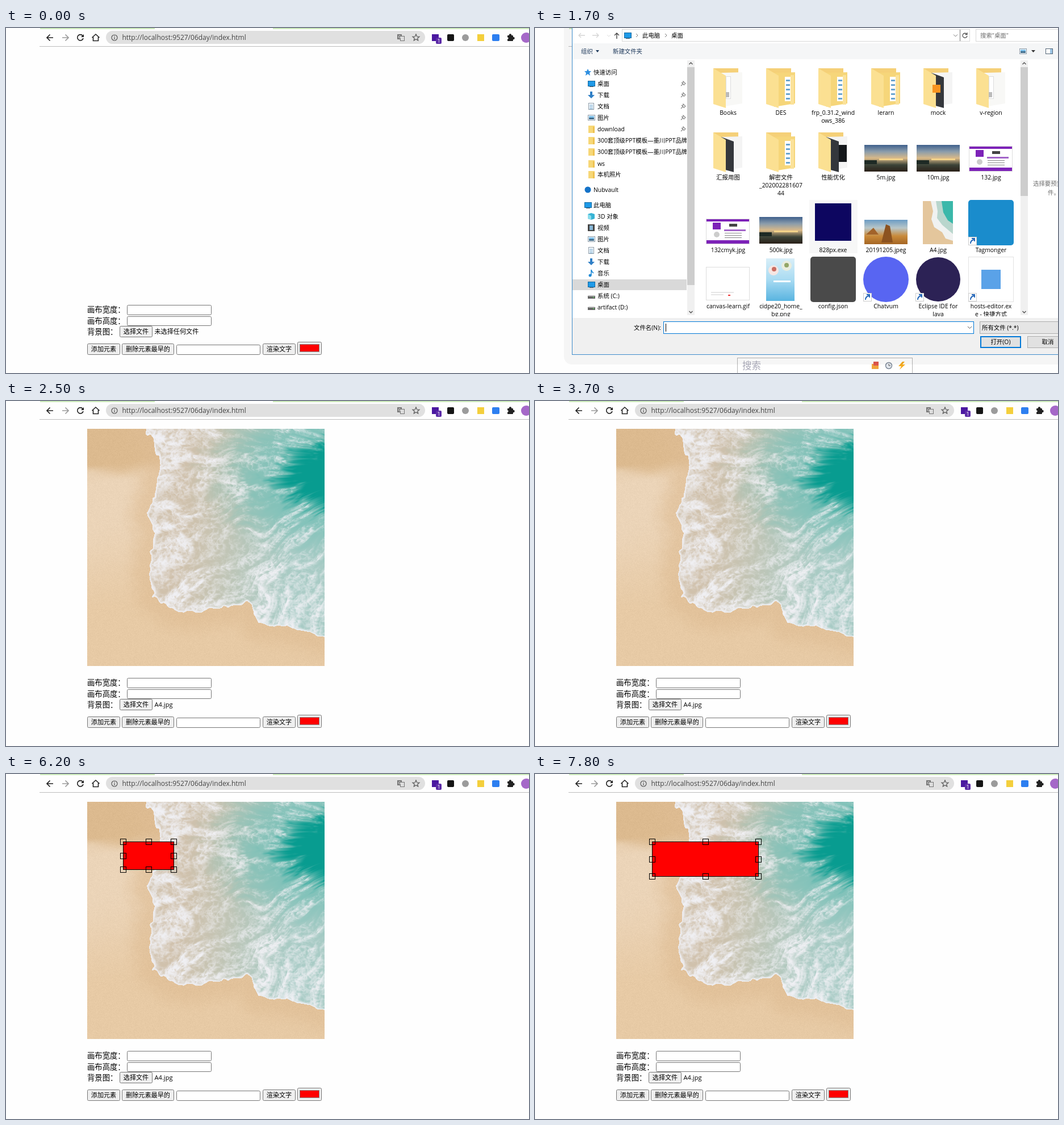
Recreate the animation shown at these times as an HTML page with a canvas. Size 921 by 608 pixels, loop 8 s.

```html
<!DOCTYPE html>
<html lang="zh">
<head>
<meta charset="utf-8">
<title>Canvas editor</title>
<style>
html, body { margin: 0; width: 100%; height: 100%; overflow: hidden; background: #fefefe; }
svg, canvas, #box { position: absolute; }
body > svg { left: 0; top: 0; width: 921px; height: 608px; overflow: hidden; }
text { font-family: "Open Sans", "Noto Sans CJK SC", "Noto Sans CJK", sans-serif; white-space: pre; }
#beach { left: 143px; top: 49px; }

.anim, #beach, #box, #box i, #dialog { animation: 8s step-end infinite; }
#beach, .late { animation-name: late; }
.early { animation-name: early; }
.add { animation-name: add; }
.remove { animation-name: remove; }
.file { animation-name: file; }
.popup { animation-name: popup; }
.content { animation-name: content; }
.picked { animation-name: picked; }
.unpicked { animation-name: unpicked; }
#dialog { animation-name: dialog; transform-origin: 522px 275px; }
#box { animation-name: box; background: red; box-shadow: inset 0 0 0 1px #000; }
#box i { animation-name: handles; position: absolute; width: 11px; height: 11px; box-sizing: border-box; border: 1px solid #000; }

@keyframes late { 0% { visibility: hidden } 31.25%, 100% { visibility: visible } }
@keyframes early { 0% { visibility: visible } 31.25%, 100% { visibility: hidden } }
@keyframes remove { 0%, 8.75%, 100% { fill: #efefef } 7.5% { fill: #e2e2e2 } }
@keyframes file { 0%, 31.25%, 100% { fill: #efefef } 10%, 13.75% { fill: #e2e2e2 } 12.5% { fill: #f5f5f5 } }
@keyframes add { 0%, 46.25%, 100% { fill: #efefef } 40%, 45% { fill: #e2e2e2 } 42.5% { fill: #f5f5f5 } }
@keyframes popup { 0%, 31.25%, 100% { opacity: 0 } 18.75% { opacity: 1 } 28.75% { opacity: .5 } 30% { opacity: .1 } }
@keyframes content { 0% { opacity: 0 } 17.5% { opacity: .5 } 18.75%, 100% { opacity: 1 } }
@keyframes picked { 0% { opacity: 0 } 27.5%, 100% { opacity: 1 } }
@keyframes unpicked { 0% { opacity: 1 } 27.5%, 100% { opacity: 0 } }
@keyframes dialog {
  0%, 31.25%, 100% { opacity: 0; transform: none }
  16.25% { opacity: .5; transform: scale(.976) }
  17.5% { opacity: .85; transform: scale(.992) }
  18.75% { opacity: 1; transform: none }
  28.75% { opacity: .62; transform: scale(.984) }
  30% { opacity: .2; transform: scale(.962) }
}
@keyframes handles { 0% { opacity: 0 } 56.25%, 100% { opacity: 1 } }
@keyframes box {
  0% { left: 407px; top: 229px; width: 0; height: 0 }
  47.5% { left: 407px; top: 229px; width: 0; height: 0; animation-timing-function: steps(3, jump-start) }
  51.25% { left: 407px; top: 229px; width: 82px; height: 50px }
  66.25% { left: 407px; top: 229px; width: 82px; height: 50px; animation-timing-function: steps(3, jump-start) }
  70% { left: 407px; top: 229px; width: 90px; height: 50px }
  72.5% { left: 407px; top: 229px; width: 90px; height: 50px; animation-timing-function: steps(5, jump-start) }
  78.75% { left: 206px; top: 119px; width: 90px; height: 50px }
  87.5% { left: 206px; top: 119px; width: 90px; height: 50px; animation-timing-function: steps(5, jump-start) }
  93.75% { left: 206px; top: 119px; width: 212px; height: 158px; animation-timing-function: steps(4, jump-start) }
  98.75%, 100% { left: 206px; top: 119px; width: 188px; height: 62px }
}
</style>
</head>
<body>
<svg id="page"></svg>
<canvas id="beach" width="418" height="418"></canvas>
<div id="box"></div>
<svg id="dialog"></svg>
<script>
const $ = id => document.getElementById(id);

// SVG helpers; text is placed by its vertical centre
const rect = (x, y, w, h, fill, more = '') => `<rect x="${x}" y="${y}" width="${w}" height="${h}" fill="${fill}" ${more}/>`;
const framed = (x, y, w, h, fill, stroke, more = '') => rect(x + .5, y + .5, w - 1, h - 1, fill, `stroke="${stroke}" ${more}`);
const circle = (x, y, r, fill, more = '') => `<circle cx="${x}" cy="${y}" r="${r}" fill="${fill}" ${more}/>`;
const poly = (points, fill) => `<polygon points="${points}" fill="${fill}"/>`;
const line = (d, stroke, width = 1) => `<path d="${d}" fill="none" stroke="${stroke}" stroke-width="${width}"/>`;
const text = (x, y, s, size = 10.4, fill = '#000', more = '') =>
  `<text x="${x}" y="${y + size * .36}" font-size="${size}" fill="${fill}" ${more}>${s}</text>`;
const middle = 'text-anchor="middle"';
const group = (cls, s) => `<g class="anim ${cls}">${s}</g>`;
const clip = (w, h, s) => `<svg width="${w}" height="${h}">${s}</svg>`;
const gradient = (id, ...stops) => `<linearGradient id="${id}" x2="0" y2="1">${stops.map((c, i) =>
  `<stop offset="${i / (stops.length - 1)}" stop-color="${c}"/>`).join('')}</linearGradient>`;

// Browser page
const field = (x, y, w, h) => framed(x, y, w, h, '#fff', '#767676', 'rx="2"');
const button = (x, y, w, label, cls) => framed(x, y, w, 20, '#efefef', '#767676', `rx="2" class="anim ${cls}"`)
  + text(x + w / 2, y + 10.5, label, 11.11, '#000', middle);

const browser = () =>
  rect(60, 0, 202, 2, '#cdebbb') + rect(470, 0, 451, 2, '#cdebbb') + rect(59, 32, 862, 1, '#bdbdbd')
  + line('M83 17H72.5M77.5 11.5L72 17L77.5 22.5', '#222', 1.7)
  + line('M99 17H109.5M104.5 11.5L110 17L104.5 22.5', '#9a9a9a', 1.7)
  + line('M135 13.5A5.2 5.2 0 1 0 136 18', '#222', 1.7) + poly('137,11 137,16 132,16', '#222')
  + line('M151.5 17L158 11L164.5 17M153.5 16V22.5H162.5V16', '#222', 1.6)
  + rect(176, 5, 562, 23, '#e0e0e0', 'rx="11.5"')
  + circle(191, 17, 5, 'none', 'stroke="#555" stroke-width="1.2"') + line('M191 16V20M191 13.5V15', '#555', 1.2)
  + text(204.5, 17, 'http://localhost:9527/06day/index.html', 12, '#444')
  + rect(689, 11, 8, 9, '#777') + framed(694, 14, 8, 9, '#ddd', '#777') + text(693, 15.5, 'G', 7, '#fff', middle)
  + line('M722 11L723.7 15L728 15.3L724.7 18L725.7 22L722 19.8L718.3 22L719.3 18L716 15.3L720.3 15Z', '#555', 1.2)
  + rect(750, 11, 12, 12, '#4a18a0') + rect(757, 17, 10, 11, '#5d2ca8', 'rx="2"') + text(762, 22.5, '1', 9, '#fff', middle)
  + rect(777, 11, 12, 12, '#151515', 'rx="2"') + circle(809, 17, 6, '#9b9b9b')
  + rect(830, 11, 12, 12, '#f4cf3c') + rect(856, 11, 13, 12, '#2d7ff0', 'rx="2"')
  + rect(883, 13, 10, 10, '#222', 'rx="1"') + circle(888, 12.5, 2.2, '#222') + circle(893.5, 18, 2.2, '#222') + circle(883, 18, 1.7, '#fefefe')
  + circle(916, 17, 9, '#a568c8');

const form = () =>
  text(143, 496.5, '画布宽度：', 13.33) + text(143, 516, '画布高度：', 13.33) + text(143, 535.5, '背景图：', 13.33)
  + field(213, 488, 149, 18) + field(213, 508, 149, 17)
  + button(200, 525, 58, '选择文件', 'file')
  + group('early', text(261.5, 535.5, '未选择任何文件', 11.11))
  + group('late', text(261.5, 535.5, 'A4.jpg', 11.11))
  + button(143, 556, 58, '添加元素', 'add') + button(204, 556, 92, '删除元素最早的', 'remove')
  + field(300, 558, 148, 18) + button(452, 556, 58, '渲染文字', '')
  + framed(513, 553, 43, 23, '#efefef', '#767676', 'rx="2"') + framed(517, 557, 35, 14, 'red', '#888');

const popup = () => group('popup',
  framed(356, 581, 309, 40, '#fff', '#b5b5b5') + text(365, 595, '搜索', 16.5, '#a9a9b8')
  + rect(593, 592, 12, 9, '#f0a43c') + rect(596, 588, 9, 7, '#e0574c')
  + circle(623, 595, 5.5, '#e4e8ee', 'stroke="#7f8a99" stroke-width="1.5"') + line('M623 592V595H626', '#555')
  + poly('647,588 640,596 645,596 642,602 652,593 647,593 651,588', '#f5ab1f'));

$('page').innerHTML = browser() + form() + popup();

// File dialog
const BLUE = '#1f8ad6';
const icons = {
  screen: (x, y) => framed(x - 6, y - 5, 13, 10, '#1f9ae8', '#12689f') + rect(x - 3, y + 5, 7, 1, '#567'),
  down: (x, y) => poly([x - 2, y - 6, x + 2, y - 6, x + 2, y, x + 6, y, x, y + 6, x - 6, y, x - 2, y], '#2f7fc6'),
  doc: (x, y) => framed(x - 5, y - 6, 10, 12, '#fff', '#8a9aa8') + line(`M${x - 3} ${y - 2}h6m-6 3h6m-6 3h6`, '#4a90c4'),
  pic: (x, y) => framed(x - 6, y - 5, 13, 10, '#fff', '#8a9aa8') + rect(x - 4, y - 3, 9, 3, '#7fc0ea') + rect(x - 4, y, 9, 3, '#3f6c8c'),
  folder: (x, y) => rect(x - 5, y - 6, 11, 13, '#f7d777') + rect(x + 3, y - 4, 3, 11, '#eec252'),
  cube: (x, y) => poly([x - 6, y - 4, x, y - 6, x + 6, y - 4, x + 6, y + 4, x, y + 6, x - 6, y + 4], '#37b3d4') + poly([x - 6, y - 4, x, y - 1, x, y + 6, x - 6, y + 4], '#8adcec'),
  film: (x, y) => rect(x - 6, y - 6, 12, 12, '#444') + rect(x - 3, y - 4, 6, 8, '#86b6d6'),
  note: (x, y) => circle(x - 2, y + 4, 2.5, BLUE) + line(`M${x} ${y + 4}V${y - 6}Q${x + 1} ${y - 2} ${x + 4} ${y}`, BLUE, 1.6),
  disk: (x, y) => rect(x - 6, y, 13, 5, '#666') + rect(x - 5, y - 1, 11, 2, '#bbb') + rect(x + 3, y + 2, 2, 1, '#5f5'),
  star: (x, y) => poly([x, y - 6, x + 2, y - 2, x + 6, y - 2, x + 3, y + 1, x + 4, y + 6, x, y + 3, x - 4, y + 6, x - 3, y + 1, x - 6, y - 2, x - 2, y - 2], '#2f8fe0'),
  dot: (x, y) => circle(x, y, 5.5, '#1573c8'),
};

const places = [
  ['star', 78, '快速访问', 0], ['screen', 98, '桌面'], ['down', 118, '下载'], ['doc', 138, '文档'], ['pic', 158, '图片'],
  ['folder', 178, 'download'], ['folder', 198, '300套顶级PPT模板—墨川PPT品牌店'], ['folder', 218, '300套顶级PPT模板—墨川PPT品牌店'],
  ['folder', 239, 'ws'], ['folder', 258, '本机照片'], ['dot', 285, 'Nubvault', 0], ['screen', 312, '此电脑', 0],
  ['cube', 332, '3D 对象'], ['film', 352, '视频'], ['pic', 372, '图片'], ['doc', 392, '文档'], ['down', 412, '下载'],
  ['note', 432, '音乐'], ['screen', 452, '桌面'], ['disk', 472, '系统 (C:)'], ['disk', 492, 'artifact (D:)'],
];
const pin = y => line(`M257 ${y + 4}l4 -4m-3 -2l5 5m-2 -7l4 4l-3 2l-2 -2z`, '#8a8a8a', 1.2);
const sidebar = () => rect(66, 443, 201, 19, '#d9d9d9') + clip(267, 505,
  places.map(([icon, y, label, level = 1]) => icons[icon](93 + level * 6, y) + text(103 + level * 7, y, label)).join('')
  + [98, 118, 138, 158, 178].map(pin).join(''));

const scrollbar = (x, end) => rect(x, 57, 13, 449, '#f0f0f0') + rect(x, 69, 13, end - 69, '#cdcdcd')
  + line(`M${x + 3.5} 64l3 -3l3 3M${x + 3.5} 499l3 3l3 -3`, '#555', 1.4);

const folder = (kind, x, y) => {
  const paper = { white: '#f8f8f6', dark: '#34373c', yellow: '#f6d67a' }[kind];
  const detail = {
    white: framed(x - 4, y + 14, 9, 40, '#fff', '#ddd') + rect(x - 6, y + 42, 8, 9, '#bbb'),
    dark: '',
    yellow: rect(x + 7, y + 15, 10, 43, '#fff') + [20, 28, 36, 44, 52].map(k => rect(x + 9, y + k, 7, 3, '#6aa5cf')).join('') + rect(x + 17, y + 12, 6, 52, '#fbe29a'),
  }[kind];
  return poly([x - 26, y, x + 18, y, x + 18, y + 62, x - 26, y + 62], '#f5d078')
    + poly([x - 12, y + 8, x + 25, y + 7, x + 25, y + 62, x - 12, y + 68], kind === 'dark' ? '#f4f4f4' : paper)
    + (kind === 'dark' ? poly([x - 12, y + 8, x + 10, y + 16, x + 10, y + 70, x - 12, y + 64], paper) : '')
    + detail + poly([x - 26, y, x - 4, y + 13, x - 4, y + 70, x - 26, y + 63], '#fbe092');
};
const shore = (x, y, w, h) => `<svg x="${x}" y="${y}" width="${w}" height="${h}" viewBox="0 0 53 76" preserveAspectRatio="none">`
  + rect(0, 0, 53, 76, '#e4c69c') + poly('14,0 18,18 15,32 20,46 34,55 40,66 53,70 53,0', '#f0f2f1')
  + poly('23,0 26,18 25,30 34,42 53,58 53,0', '#b9d6cd') + poly('33,0 36,20 44,34 53,40 53,0', '#3bb8aa') + '</svg>';
const sunset = (x, y) => rect(x - 38, y, 76, 47, 'url(#dusk)') + rect(x - 12, y + 24, 42, 3, '#f3d38a') + rect(x - 38, y + 27, 22, 7, '#1e2a25');
const card = (x, y) => framed(x - 39, y, 77, 45, '#fff', '#ddd') + rect(x - 38, y + 1, 75, 4, '#7d22b8') + rect(x - 38, y + 38, 75, 6, '#7d22b8')
  + rect(x - 27, y + 7, 14, 12, '#7d22b8') + rect(x + 2, y + 9, 14, 5, '#444') + rect(x - 7, y + 19, 38, 3, '#a264c8')
  + [25, 29, 33].map(k => rect(x - 6, y + k, 30, 1, '#888')).join('') + circle(x - 20, y + 28, 5, '#ccc');
const shortcut = (x, y) => framed(x - 40, y, 15, 15, '#fff', '#ccc') + line(`M${x - 36} ${y + 12}q0 -6 6 -7m-4 -2h5v5`, '#1a5fb4', 1.8);

// label lines, label y, column, drawing
const files = [
  ['Books', 149, 0, x => folder('white', x, 71)], ['DES', 149, 1, x => folder('yellow', x, 71)],
  ['frp_0.31.2_wind|ows_386', 149, 2, x => folder('yellow', x, 71)], ['lerarn', 149, 3, x => folder('yellow', x, 71)],
  ['mock', 149, 4, x => folder('dark', x, 71) + rect(x - 10, 100, 14, 14, '#f79420')], ['v-region', 149, 5, x => folder('white', x, 71)],
  ['汇报用图', 263, 0, x => folder('dark', x, 184)], ['解密文件|_202002281607|44', 263, 1, x => folder('yellow', x, 184)],
  ['性能优化', 263, 2, x => folder('dark', x, 184) + rect(x + 10, 206, 14, 30, '#15181b')],
  ['5m.jpg', 263, 3, x => sunset(x, 206)], ['10m.jpg', 263, 4, x => sunset(x, 206)], ['132.jpg', 263, 5, x => card(x, 208)],
  ['132cmyk.jpg', 391, 0, x => card(x, 336)], ['500k.jpg', 391, 1, x => sunset(x, 333)],
  ['828px.exe', 391, 2, x => rect(x - 42, 303, 85, 94, '#f7f7f7') + rect(x - 32, 309, 64, 66, '#0d0660')],
  ['20191205.jpeg', 391, 3, x => rect(x - 38, 338, 76, 43, 'url(#desert)') + poly([x - 8, 378, x, 346, x + 7, 349, x + 12, 378], '#8c5320') + poly([x - 35, 364, x - 22, 352, x - 13, 364], '#a2632a')],
  ['A4.jpg', 391, 4, x => shore(x - 27, 305, 53, 76)],
  ['Tagmonger', 391, 5, x => rect(x - 40, 303, 80, 80, '#1a8ccc', 'rx="5"') + shortcut(x, 368)],
  ['canvas-learn.gif', 490, 0, x => framed(x - 39, 421, 77, 59, '#fff', '#ddd') + line(`M${x - 30} 466h40m-40 4h22`, '#ccc') + rect(x, 470, 4, 2, '#e33')],
  ['cidpe20_home_|bg.png', 490, 1, x => rect(x - 26, 406, 50, 75, 'url(#poster)') + circle(x - 13, 427, 9, '#f6e6e2') + circle(x + 10, 419, 9, '#e9eddf') + circle(x - 12, 425, 4, '#c96d62') + circle(x + 10, 418, 4, '#93a668') + rect(x - 13, 445, 30, 3, '#fff')],
  ['config.json', 490, 2, x => rect(x - 40, 403, 80, 80, '#4a4a4a', 'rx="5"')],
  ['Chatvum', 490, 3, x => circle(x, 443, 40, '#5865f2') + shortcut(x, 467)],
  ['Eclipse IDE for|Java', 490, 4, x => circle(x, 443, 39, '#2c2255') + shortcut(x, 467)],
  ['hosts-editor.ex|e - 快捷方式', 490, 5, x => framed(x - 40, 403, 80, 80, '#fff', '#e2e2e2') + rect(x - 17, 426, 34, 34, '#5aa2e8') + shortcut(x, 467)],
];
const fileGrid = () => group('picked', framed(660, 302, 84, 97, '#cce8ff', '#99d1ff')) + clip(855, 508,
  files.map(([label, y, column, draw]) => {
    const x = Math.round(340 + column * 92.6);
    return draw(x) + label.split('|').map((s, i) => text(x, y + i * 14.3, s, 10.4, '#000', middle)).join('');
  }).join(''));

const toolbar = () =>
  line('M88 13H77M81 9l-4 4l4 4M101 13h11m-4 -4l4 4l-4 4', '#d5d5d5', 1.3) + line('M127 12l3 3l3 -3', '#ddd')
  + line('M144 19V9m-4 4l4 -4l4 4', '#444', 1.4)
  + framed(153, 2, 613, 22, '#fff', '#d9d9d9') + icons.screen(163, 13)
  + line('M178 10l3 3l-3 3M229 10l3 3l-3 3M737 11.5l3.5 3.5l3.5 -3.5M748.5 3V23', '#777')
  + text(189, 13, '此电脑') + text(240, 13, '桌面')
  + line('M760 10.5A4 4 0 1 0 761 14M761 8v3.5h-3.5', '#555', 1.3)
  + framed(776, 2, 170, 22, '#fff', '#d9d9d9') + text(784, 13, '搜索"桌面"', 10.4, '#6d6d6d')
  + rect(66, 27, 880, 28, '#f5f6f7') + text(81, 41, '组织', 10.4, '#1e395b') + poly('107,39 113,39 110,43', '#1e395b')
  + text(137, 41, '新建文件夹', 10.4, '#1e395b') + icons.pic(859, 41) + poly('874,39 881,39 877.5,43', '#333')
  + framed(899, 36, 13, 10, '#fff', '#567') + rect(907, 37, 4, 8, '#9cc4e4') + circle(932, 41, 6, BLUE);

const footer = () =>
  text(222, 528, '文件名(N):', 10.4, '#000', 'text-anchor="end"')
  + framed(226, 517, 547, 22, '#fff', '#0078d7') + line('M762 526l3.5 3.5l3.5 -3.5', '#555')
  + group('unpicked', rect(230, 521, 1, 14, '#000')) + group('picked', text(231, 528, 'A4.jpg'))
  + framed(783, 517, 170, 22, '#e5e5e5', '#adadad') + text(787, 528, '所有文件 (*.*)')
  + rect(785, 544, 70, 19, '#e1e1e1', 'stroke="#0078d7" stroke-width="2"') + text(820, 553.5, '打开(O)', 10.4, '#000', middle)
  + framed(867, 543, 72, 21, '#e1e1e1', '#adadad') + text(903, 553.5, '取消', 10.4, '#000', middle);

const preview = () =>
  group('unpicked', text(877, 274, '选择要预览的文', 10.4, '#6d6d6d') + text(903, 290, '件。', 10.4, '#6d6d6d'))
  + group('picked', shore(889, 239, 58, 82));

const emptyFooter = () => rect(66, 511, 949, 64, '#f0f0f0')
  + rect(66, 521, 707, 19, '#fff') + rect(783, 521, 200, 19, '#fff') + rect(783, 546, 74, 20, '#fff') + rect(866, 546, 80, 20, '#fff');

$('dialog').innerHTML = '<defs>' + gradient('dusk', '#3f608c', '#8a9cab', '#d9b988', '#3c4338', '#2a2018')
  + gradient('desert', '#6b9cc4', '#b8c6c8', '#c98a3a', '#a56624') + gradient('poster', '#d8eef8', '#a9dbf2', '#59b4e0') + '</defs>'
  + rect(51, -60, 1000, 653, '#000', 'rx="14" opacity=".035"')
  + framed(65, -42, 950, 618, '#fff', '#3d8ccb') + rect(66, -41, 950, 40, '#0078d7')
  + emptyFooter() + scrollbar(855, 296)
  + group('content', rect(66, 511, 949, 64, '#f0f0f0') + toolbar() + sidebar() + scrollbar(268, 453) + fileGrid() + preview() + footer());

// Selection handles
for (const row of [0, 50, 100]) for (const col of [0, 50, 100]) {
  if (row === 50 && col === 50) continue;
  const handle = document.createElement('i');
  const offset = p => `calc(${p}% - ${5 + p / 100}px)`;
  handle.style.left = offset(col);
  handle.style.top = offset(row);
  $('box').append(handle);
}

// Beach picture from layered value noise
const SIZE = 418;
const shoreline = [[102, 0], [117, 25], [126, 50], [125, 80], [119, 110], [106, 150], [119, 185], [112, 220], [109, 255], [117, 295],
  [147, 317], [177, 324], [217, 318], [257, 313], [285, 305], [290, 325], [302, 343], [337, 347], [367, 353], [397, 363], [418, 369],
  [900, 385], [900, -500], [90, -500]];
const hash = (x, y) => { const s = Math.sin(x * 127.1 + y * 311.7) * 43758.5453; return s - Math.floor(s); };
const lerp = (a, b, k) => a + (b - a) * k;
const mix = (a, b, k) => a.map((v, i) => lerp(v, b[i], k));
const smooth = (a, b, v) => { const k = Math.min(1, Math.max(0, (v - a) / (b - a))); return k * k * (3 - 2 * k); };
const noise = (x, y) => {
  const i = Math.floor(x), j = Math.floor(y), u = smooth(0, 1, x - i), v = smooth(0, 1, y - j);
  return lerp(lerp(hash(i, j), hash(i + 1, j), u), lerp(hash(i, j + 1), hash(i + 1, j + 1), u), v);
};
const fbm = (x, y) => noise(x, y) * .5 + noise(x * 2.1, y * 2.1) * .3 + noise(x * 4.3, y * 4.3) * .2;

// Distance to the shoreline, positive on the water side
function depth(x, y) {
  let best = 1e9, inside = false;
  shoreline.forEach(([ax, ay], i) => {
    const [bx, by] = shoreline[(i + 1) % shoreline.length], dx = bx - ax, dy = by - ay;
    const k = Math.min(1, Math.max(0, ((x - ax) * dx + (y - ay) * dy) / (dx * dx + dy * dy)));
    best = Math.min(best, (x - ax - k * dx) ** 2 + (y - ay - k * dy) ** 2);
    if ((ay > y) !== (by > y) && x < ax + dx * (y - ay) / dy) inside = !inside;
  });
  return Math.sqrt(best) * (inside ? 1 : -1);
}

function sand(x, y, d) {
  const drift = noise(x / 60, y / 25) * 30 - 15;
  let c = mix([220, 186, 143], [235, 212, 184], smooth(55, 90, y + drift));
  c = mix(c, [231, 202, 165], smooth(150, 330, y + drift));
  c = mix(c, [222, 188, 147], .6 * smooth(-55, -5, d));
  const grain = (hash(x, y) - .5) * 8;
  return c.map(v => v + grain);
}

// Foam streaks fan out from the deep water at the right
function water(x, y, d) {
  const dx = x - 540, dy = y - 65, r = Math.hypot(dx, dy), angle = Math.atan2(dy, -dx);
  const streak = fbm(r / 38 + noise(x / 30, y / 30), angle * 26 + noise(x / 45, y / 45) * 3);
  const lace = 1 - Math.abs(2 * fbm(x / 9 + streak * 2, y / 9) - 1);
  const wobble = (streak - .5) * .8;
  const away = Math.hypot((x - 430) / 92, (y - 82) / 58) + wobble;
  const teal = smooth(1.25, .65, away), aqua = smooth(2.7, 1.1, away);
  let c = mix([208, 193, 172], [168, 203, 197], smooth(150, 390, x + (y - 150) * .1));
  c = mix(c, [120, 192, 183], aqua * .8);
  c = mix(c, [8, 156, 144], teal);
  const edge = .34 + Math.min(d, 160) * .001 + teal * .5 + aqua * .06;
  const foam = smooth(edge, edge + .5, streak * .62 + lace * .38);
  return mix(c, [240, 240, 244], Math.max(foam, .9 * smooth(6, 1, d)));
}

const ctx = $('beach').getContext('2d');
const image = ctx.createImageData(SIZE, SIZE);
for (let y = 0, p = 0; y < SIZE; y++) for (let x = 0; x < SIZE; x++, p += 4) {
  const d = depth(x + (noise(x / 8, y / 8) - .5) * 7, y + (noise(x / 8 + 90, y / 8) - .5) * 7);
  image.data.set([...(d < 0 ? sand : water)(x, y, d), 255], p);
}
ctx.putImageData(image, 0, 0);
</script>
</body>
</html>
```
